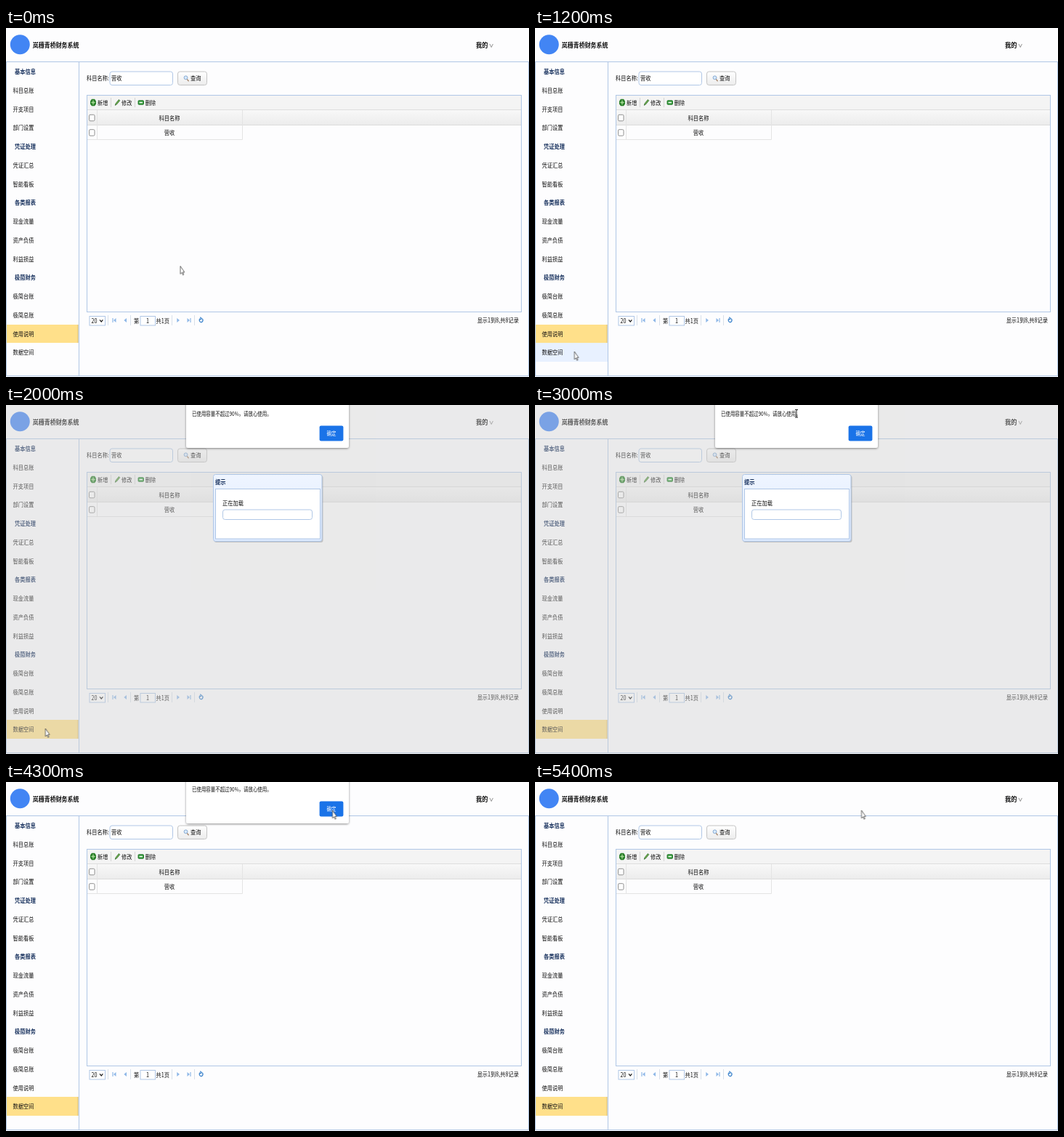
These frames come from a looping animation (720x480 px, 5900 ms). An HTML page:

```html
<!DOCTYPE html>
<html lang="zh-CN">
<head>
<meta charset="utf-8">
<title>财务系统</title>
<style>
html, body { margin: 0; width: 100%; height: 100%; overflow: hidden; background: #fdfdfe; }
svg { display: block; width: 100%; height: 100%; }
text { font-family: "Noto Sans CJK SC", "Noto Sans CJK", "Noto Sans", sans-serif; fill: #111; }
.b { font-weight: 700; }
.navy { fill: #1a335f; }
.white { fill: #fff; }
.mid { text-anchor: middle; }
.end { text-anchor: end; }
.loop { animation: 5.9s step-end infinite; }

/* hard changes */
.before { animation-name: before; }
.hover { animation-name: hover; }
.after { animation-name: after; }
.loading { animation-name: loading; }
.alert { animation-name: alert; }
.ok { animation-name: ok; }
.arrow { animation-name: arrow; }
.beam { animation-name: beam; }
@keyframes before { 0% { opacity: 1 } 22.03%, 100% { opacity: 0 } }
@keyframes hover { 0% { opacity: 0 } 16.94% { opacity: 1 } 22.03%, 100% { opacity: 0 } }
@keyframes after { 0% { opacity: 0 } 22.03%, 100% { opacity: 1 } }
@keyframes loading { 0% { opacity: 0 } 22.03% { opacity: 1 } 72.88%, 100% { opacity: 0 } }
@keyframes alert {
  0% { opacity: 0; transform: translateY(-2px) }
  25.42% { opacity: 1; transform: translateY(-2px) }
  27.11% { opacity: 1; transform: none }
  72.88% { opacity: 1; transform: translateY(-2px) }
  74.57%, 100% { opacity: 0; transform: translateY(-2px) }
}
@keyframes ok { 0% { fill: #1a73e8 } 66.1% { fill: #2f7ee8 } 72.88%, 100% { fill: #1a73e8 } }
@keyframes arrow { 0% { opacity: 1 } 50.84% { opacity: 0 } 57.62%, 100% { opacity: 1 } }
@keyframes beam { 0% { opacity: 0 } 50.84% { opacity: 1 } 57.62%, 100% { opacity: 0 } }

/* the pointer moves in 100 ms steps */
.pointer { animation: pointer 5.9s infinite; }
@keyframes pointer {
  0% { transform: translate(240px, 327.5px); animation-timing-function: steps(3) }
  5.08% { transform: translate(211px, 345px); animation-timing-function: steps(3) }
  10.16% { transform: translate(147px, 386px); animation-timing-function: steps(3) }
  15.25% { transform: translate(83px, 427px); animation-timing-function: steps(3) }
  20.33%, 38.98% { transform: translate(54.3px, 445px); animation-timing-function: steps(2) }
  42.37% { transform: translate(121px, 350px); animation-timing-function: steps(3) }
  47.45% { transform: translate(312px, 80px); animation-timing-function: steps(2) }
  50.84%, 55.93% { transform: translate(360px, 12px); animation-timing-function: steps(3) }
  61.01% { transform: translate(403px, 25px); animation-timing-function: steps(4) }
  67.79%, 100% { transform: translate(449.5px, 39px) }
}
</style>
</head>
<body>
<svg id="stage" viewBox="0 0 720 480" preserveAspectRatio="none"></svg>
<script>
const BLUE = '#b0c7e6';
const ROW = 25.75, MENU_TOP = 47.2;

const text = (x, y, str, cls = '', size = 8.4) =>
  `<text class="${cls}" font-size="${size}" transform="translate(${x} ${y + size * .37}) scale(.86 1)">${str}</text>`;
const rect = (x, y, w, h, fill, stroke = 'none', r = 0, extra = '') =>
  `<rect x="${x}" y="${y}" width="${w}" height="${h}" rx="${r}" fill="${fill}" stroke="${stroke}" ${extra}/>`;
const path = (d, stroke, fill = 'none', width = 1) =>
  `<path d="${d}" stroke="${stroke}" fill="${fill}" stroke-width="${width}"/>`;
const gradient = (id, from, to) =>
  `<linearGradient id="${id}" x2="0" y2="1"><stop stop-color="${from}"/><stop offset="1" stop-color="${to}"/></linearGradient>`;
const group = (cls, ...parts) => `<g class="${cls}">${parts.join('')}</g>`;
const checkbox = y => rect(114.5, y, 7.5, 8.5, '#fff', '#858585', 1.5, 'stroke-width=".9"');

const menu = [
  ['基本信息', '科目总账', '开支项目', '部门设置'],
  ['凭证处理', '凭证汇总', '智能看板'],
  ['各类报表', '现金流量', '资产负债', '利益损益'],
  ['极简财务', '极简台账', '极简总账', '使用说明', '数据空间'],
].flatMap(section => section.map((label, i) => ({ label, heading: i === 0 })));

const rowTop = i => MENU_TOP + ROW * i;
const rowRect = (i, width, fill) => {
  const top = Math.round(rowTop(i));
  return rect(1, top, width, Math.round(rowTop(i + 1)) - top, fill);
};
const selected = i => rowRect(i, 98.5, '#d6b868') + rowRect(i, 97.5, '#ffe08a');

const defs = '<defs>' + gradient('button', '#fff', '#ececec') + gradient('head', '#f8f8f8', '#ececec') +
  gradient('title', '#eff5ff', '#dce9ff') +
  '<filter id="shadow" x="-10%" y="-20%" width="120%" height="150%">' +
  '<feDropShadow dx="0" dy="1" stdDeviation="1.6" flood-opacity=".45"/></filter></defs>';

const header = '<circle cx="19.3" cy="22.7" r="13.5" fill="#4285f4"/>' +
  text(36.7, 23.5, '岚穗青桥财务系统', 'b', 9.3) +
  text(647, 23.5, '我的', 'b', 9.5) +
  path('M666 22l2.2 4.5 2.2-4.5', '#777', 'none', .8);

const sidebar = group('loop before', selected(14)) +
  group('loop hover', rowRect(15, 99, '#e8f1ff')) +
  group('loop after', selected(15)) +
  menu.map(({ label, heading }, i) =>
    text(heading ? 12 : 9.5, rowTop(i) + ROW / 2, label, heading ? 'b navy' : '')).join('');

const frame = path('M0 46.5H719.5V478.5H.5V46.5M100.5 46.5V478.5', BLUE);

const search = text(111, 69, '科目名称:') +
  rect(143, 60, 86.5, 18.5, '#fff', BLUE, 3) + text(145, 69.3, '营收') +
  rect(236.5, 60, 40, 18.5, 'url(#button)', '#c4c4c4', 3) +
  '<circle cx="247.5" cy="68.3" r="2.4" fill="#d8eaff" stroke="#86a9d0"/>' +
  path('M249.3 70.5l2.3 2.8', '#a98a70', 'none', 1.4) + text(254, 69.3, '查询');

const toolbar = rect(111.5, 92.5, 598, 20, '#f4f4f4') + path('M111 112.5H709', '#ddd') +
  path('M118 97.8h4l2 2.6v4.2l-2 2.6h-4l-2-2.6v-4.2z', 'none', '#2a7f2a') +
  path('M120 99.6v5.8M117.4 102.5h5.2', '#a9dc98', 'none', 1.3) + text(126, 102.5, '新增') +
  path('M150.3 106.3l.8-2.5 4.3-5.3 1.3 1.3-4.3 5.3z', '#2c642c', '#75b84c', .8) + text(159, 102.5, '修改') +
  rect(182, 99.7, 7.5, 5.6, '#2f9a36', '#1d6c25', 1, 'stroke-width=".8"') +
  path('M183.5 102.5h4.5', '#fff', 'none', 1.6) + text(191.7, 102.5, '删除') +
  path('M144.5 96v13M177.5 96v13', '#d4d4d4');

const grid = rect(111.5, 113, 598, 20.5, 'url(#head)') + path('M111 133.5H709', '#dcdcdc') +
  path('M125.5 113V153.5M325.5 113V153.5M112 153.5H325.5', '#e4e4e4') +
  checkbox(119.3) + checkbox(139.7) +
  text(225, 123.5, '科目名称', 'mid') + text(225, 144, '营收', 'mid') +
  rect(111.5, 92.5, 598, 298, 'none', BLUE);

const pager = rect(115, 396.5, 21.5, 12.5, '#fff', BLUE) + text(117.5, 402.8, '20') +
  path('M129 401.3l2.2 2.6 2.2-2.6', '#222', 'none', 1.3) +
  path('M140.5 395v14M171.5 395v14M228.5 395v14M259.5 395v14', '#d8e0ea') +
  path('M147 399v6', '#9fc2ea', 'none', 1.4) +
  path('M151.5 399v6l-3.5-3zM166 399v6l-3.7-3zM235.3 399v6l3.7-3zM249.5 399v6l3.5-3z', 'none', '#8fb8e8') +
  path('M254 399v6', '#9fc2ea', 'none', 1.4) +
  path('M267.5 399.6a2.3 2.7 0 1 0 2.7.4M267.2 397.8l2.2 1.7-1.9 1.8', '#3d84cc', 'none', 1.2) +
  text(176, 403, '第') + rect(185, 396.5, 20.5, 12.5, '#fff', BLUE) +
  text(195, 402.8, '1', 'mid') + text(206.5, 403, '共1页') +
  text(706, 402, '显示1到8,共8记录', 'end');

const loading = group('loop loading',
  rect(0, 0, 720, 480, '#ccc', 'none', 0, 'fill-opacity=".4"'),
  rect(286.5, 97, 150, 92, '#777', 'none', 3, 'opacity=".35"'),
  rect(285.5, 95.5, 149.5, 92, 'url(#title)', BLUE, 3),
  rect(288.5, 115.5, 144, 68.5, '#fff', BLUE),
  text(288, 105.5, '提示', 'b navy'),
  text(298, 135, '正在加载'),
  rect(298.5, 144, 123, 13.5, '#fff', BLUE, 3));

const alertBox = group('loop alert',
  rect(248, -6, 224, 65, '#fff', 'none', 3, 'filter="url(#shadow)"'),
  text(256, 12.3, '已使用容量不超过90%，请放心使用。', '', 7.5),
  rect(431.6, 28.4, 32.8, 21, '#1a73e8', 'none', 2.2, 'class="loop ok"'),
  text(448, 39, '确定', 'mid white', 7.5));

const pointer = group('pointer',
  group('loop arrow', path('M0 0V10.8L2 8.8 3.5 12.2 4.8 11.6 3.4 8.3H5.8Z', '#444', '#fff', .8)),
  group('loop beam', path('M-2-5.5H2M0-5.5V5M-2 5H2', '#222')));

document.getElementById('stage').innerHTML =
  defs + rect(0, 0, 720, 480, '#fdfdfe') + header + sidebar + frame + search +
  toolbar + grid + pager + loading + alertBox + pointer;
</script>
</body>
</html>
```
